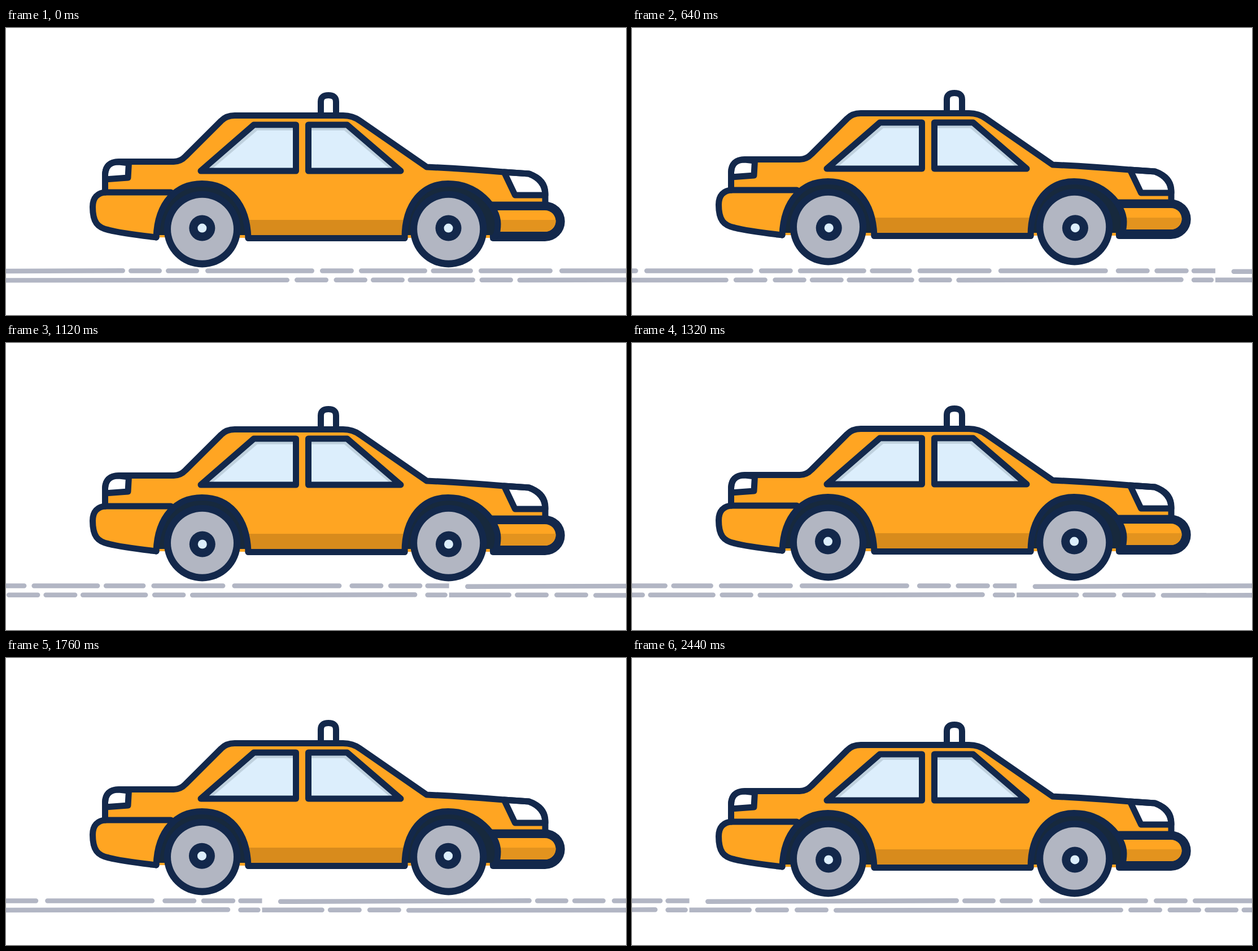
These frames come from a looping animation (1098x510 px, 2480 ms). An HTML page:

```html
<!DOCTYPE html>
<html lang="en">
<head>
<meta charset="utf-8">
<title>Driving cab</title>
<style>
  html, body { margin: 0; width: 100%; height: 100%; overflow: hidden; background: #fff; }
  svg { display: block; width: 1098px; height: 510px; }
  .line { fill: none; stroke: #13284b; stroke-width: 11; stroke-linecap: round; stroke-linejoin: round; }
  .navy { fill: #13284b; }
  .arch { fill: #17293d; }
  .paint { fill: #ffa522; }
  .glass { fill: #dceefc; }
  .tint { fill: #bfd1de; }
  .white { fill: #fff; }
  .rim { fill: #b2b6c2; }
  .road { fill: none; stroke: #b2b6c4; stroke-width: 8.4; stroke-linecap: round; }
</style>
</head>
<body>
<svg viewBox="0 0 1098 510">
  <defs>
    <clipPath id="tileClip"><rect x="-266.4" y="420" width="1630.7" height="40"/></clipPath>
    <g id="wheel">
      <circle class="navy" r="67.7"/>
      <circle class="rim" cy="-.5" r="55.5"/>
      <g class="hub">
        <circle class="navy" r="23"/>
        <circle class="glass" r="8"/>
      </g>
    </g>
  </defs>

  <g id="road">
    <g id="tile" class="road" clip-path="url(#tileClip)"></g>
    <use href="#tile" x="1630.7"/>
  </g>

  <g id="car">
    <!-- roof lamp -->
    <path class="line" style="fill:#fff;stroke-linecap:butt" d="M557.5 151V131Q557.5 119.5 571 119.5Q584.5 119.5 584.5 131V151"/>

    <!-- body -->
    <path class="paint" d="M175.5 292V262Q175.5 237.5 200 237.5H297Q309 237.5 318 228L381 165Q390 155.5 405 155.5H597Q614 155.5 627 165L745 247Q810 250 882 256L926 259Q955 269 955 294V340L870 373H429L266 372Q205 365 182 359C162 355 153.5 345 153.5 318C153.5 302 162 292 178 292Z"/>
    <path fill="#d88b1c" d="M429 341H706V373H429Z"/>

    <!-- lights -->
    <path class="line" style="fill:#fff" d="M175.5 269V262Q175.5 238 200 238L217.5 240L216 266Z"/>
    <path class="line" style="fill:#fff" d="M882 256L926 259Q955 270 955 297H901.5Z"/>

    <!-- outline -->
    <path class="line" d="M175.5 292V262Q175.5 237.5 200 237.5H297Q309 237.5 318 228L381 165Q390 155.5 405 155.5H597Q614 155.5 627 165L745 247Q810 250 882 256L926 259Q955 269 955 294V312"/>
    <path class="line" d="M292 292H178C162 292 153.5 302 153.5 318C153.5 345 162 355 182 359C205 365 240 369 266 372"/>
    <path class="line" d="M429 373.5H706"/>

    <!-- front bumper -->
    <path class="navy" d="M855 308.5H954.5a35.2 35.2 0 0 1 0 70.4H863Q857 379 857 373Z"/>
    <path class="paint" d="M868 324H954.5a19 19 0 0 1 0 38H868Z"/>
    <path fill="#e3931e" d="M868 341H973.5a19 19 0 0 1-19 21H868Z"/>

    <!-- wheel arches -->
    <path class="arch" d="M266 368C268 310 302 276.5 347 276.5C395 276.5 427 312 429 368Z"/>
    <path class="line" d="M266 372C268 310 302 276.5 347 276.5C395 276.5 427 312 429 373"/>
    <path class="arch" d="M706 368C706 312 738 276.5 783 276.5C835 276.5 871 318 871 348L868 368Z"/>
    <path class="line" d="M706 373C706 312 738 276.5 783 276.5C835 276.5 871 318 871 348Q871 360 868 368L863 373"/>

    <!-- windows -->
    <path class="tint" d="M345 254L439 172H513.5V254Z"/>
    <path class="glass" d="M361 254L445 182H513.5V254Z"/>
    <path class="line" d="M345 254L439 172H513.5V254Z"/>
    <path class="tint" d="M535.5 172H604L699 254H535.5Z"/>
    <path class="glass" d="M535.5 182H599L684 254H535.5Z"/>
    <path class="line" d="M535.5 172H604L699 254H535.5Z"/>

    <use href="#wheel" x="0" y="0" style="display:none"/>
    <g id="wheels"></g>
  </g>
</svg>
<script>
  const LOOP = 2480, STEP = 40;
  const SPEED = 0.5175;        // road, px per ms
  const BOB = 400, LIFT = 5;   // car bounce period and height
  const SPIN = 444, ORBIT = 2; // hub turn period and offset

  const svgNS = 'http://www.w3.org/2000/svg';
  const byId = id => document.getElementById(id);

  // Dashes as [left, right, y left, y right]
  const upper = [
    [-238, 211, 432.8, 431.3], [217, 276], [283, 342], [353, 546], [556, 616],
    [625, 746], [752.5, 827], [837, 968], [980, 1174], [1188, 1248],
    [1256.5, 1317], [1322, 1380]
  ];
  const lower = [
    [-280, -156], [-150, -90], [-80, -20], [-11, 502, 448.4, 447.9], [511, 571],
    [580.5, 640], [646, 706], [711.5, 831], [838.5, 898], [905.5, 1308, 448, 447.3],
    [1322, 1361.5]
  ];

  function addDashes(dashes, y) {
    for (const [left, right, y1 = y, y2 = y] of dashes) {
      const path = document.createElementNS(svgNS, 'path');
      path.setAttribute('d', `M${left + 4.2} ${y1}L${right - 4.2} ${y2}`);
      byId('tile').append(path);
    }
  }
  addDashes(upper, 431.5);
  addDashes(lower, 447.7);

  const hubs = [347.5, 783.7].map(x => {
    const wheel = byId('wheel').cloneNode(true);
    wheel.removeAttribute('id');
    wheel.setAttribute('transform', `translate(${x} 357.7)`);
    byId('wheels').append(wheel);
    return wheel.querySelector('.hub');
  });

  const move = (el, x, y) => el.setAttribute('transform', `translate(${x} ${y})`);

  function draw(time) {
    const t = Math.floor((time % LOOP) / STEP) * STEP;
    const phase = (t % BOB) / BOB;
    const lift = LIFT * (1 - Math.abs(1 - 2 * phase));
    const turn = 2 * Math.PI * t / SPIN - 1.75;

    move(byId('road'), -SPEED * t, 0);
    move(byId('car'), 0, -lift);
    for (const hub of hubs) {
      move(hub, 0.2 + ORBIT * Math.cos(turn), -0.2 + ORBIT * Math.sin(turn));
    }
  }

  const start = performance.now();
  function tick() {
    draw(performance.now() - start);
    requestAnimationFrame(tick);
  }
  tick();
</script>
</body>
</html>
```
